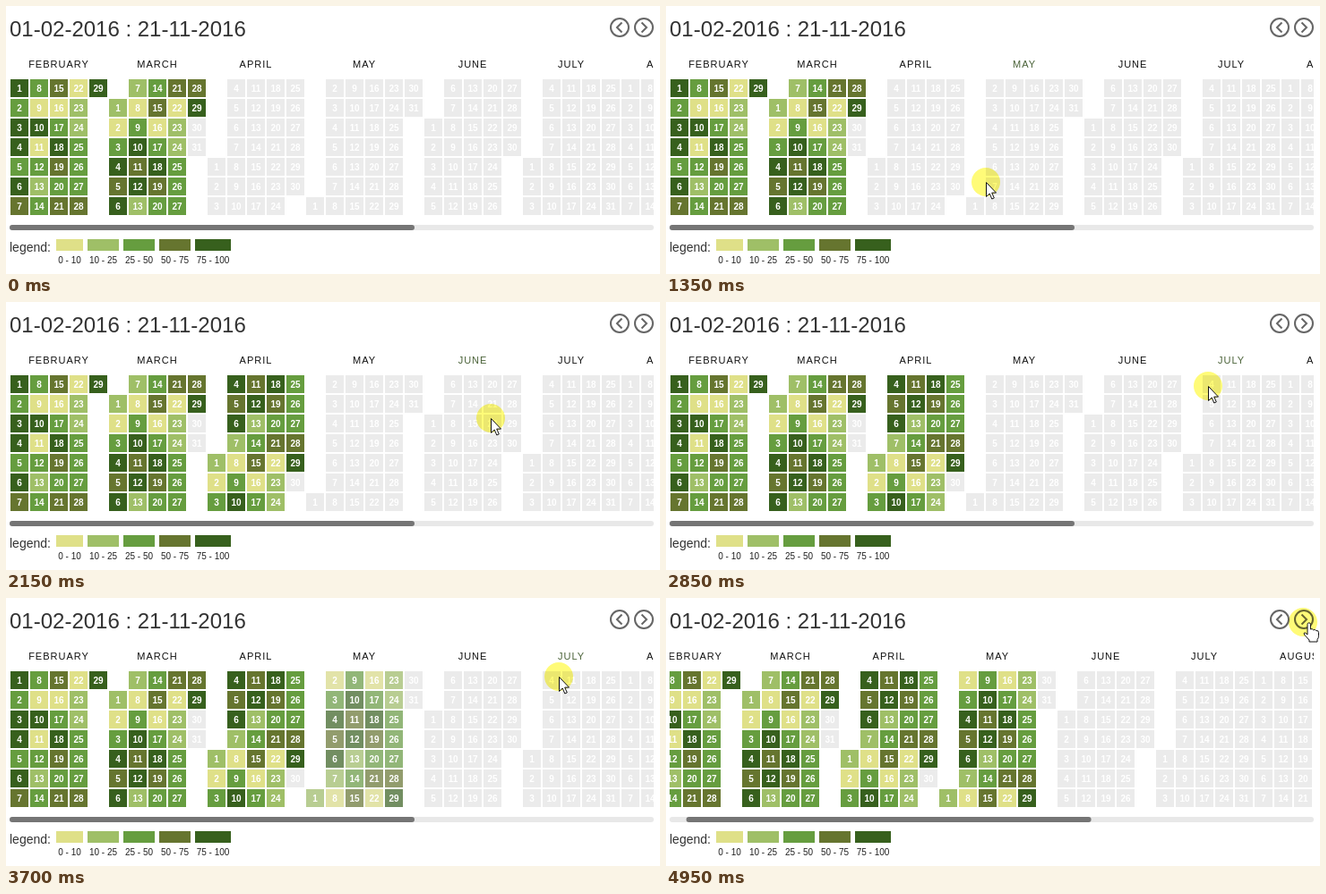
These frames come from a looping animation (730x300 px, 5 s). An HTML page:

```html
<!DOCTYPE html>
<html lang="en">
<head>
<meta charset="utf-8">
<title>Calendar heat map</title>
<style>
html, body { margin: 0; width: 100%; height: 100%; overflow: hidden; background: #fff; }
svg { display: block; font-family: "Liberation Sans", Arial, sans-serif; }
.title { font-size: 24px; fill: #333; }
.month { font-size: 11px; letter-spacing: 1px; text-anchor: middle; }
.day { font-size: 10px; font-weight: bold; fill: #fff; text-anchor: middle; }
.legend { font-size: 14px; fill: #333; }
.range { font-size: 10px; fill: #222; text-anchor: middle; }
.icon { fill: none; stroke: #666; stroke-width: 2; }
.pointer { fill: #fff; stroke: #111; stroke-linejoin: round; }
#halo { fill: #fffb78; mix-blend-mode: multiply; }
</style>
</head>
<body>
<svg id="stage" width="730" height="300">
  <text class="title" x="4" y="34">01-02-2016 : 21-11-2016</text>
  <g class="icon">
    <circle cx="685" cy="24" r="10"/><path d="M687.5 18.5L682 24l5.5 5.5"/>
    <circle cx="712" cy="24" r="10"/><path d="M709.5 18.5L715 24l-5.5 5.5"/>
  </g>
  <svg x="4" width="719" height="300"><g id="months"></g></svg>
  <rect x="4" y="245" width="719" height="6" rx="3" fill="#e8e8e8"/>
  <rect id="thumb" x="4" y="245" width="452" height="6" rx="3" fill="#757575"/>
  <text class="legend" x="4" y="275">legend:</text>
  <g id="legend"></g>
  <circle id="halo" r="16"/>
  <path id="arrow" class="pointer" d="M.5 .5V16.500l3.700-3.500 2.600 6 2.500-1.100-2.600-5.800H11.500z"/>
  <path id="hand" class="pointer" d="M5 14V2.500a1.700 1.700 0 0 1 3.400 0V8q2-1.200 3.200.8 2-1 3.100.8 2.800-.6 2.800 2v4q0 2-1.500 4v2.400H7v-2L1.500 14q-1.200-2.600 1.200-2z"/>
</svg>
<script>
const LOOP = 5000, STEP = 50, PITCH = 22, TOP = 82;
const COLORS = ['#dfe088', '#9fbf67', '#669d3f', '#66752f', '#37601d'];
const FEBRUARY = '42442432040212302432301122234';
const LATER = '10243410243412302432301122234';
const FADE = 450, fadeStart = { 3: 1400, 4: 3400 };
// time, x, y
const POINTER = [
  [350, -40, 230], [900, 10, 225], [1350, 357, 197], [2150, 541, 130],
  [2850, 605, 94], [3700, 617, 88], [4000, 627, 82], [4350, 709, 28], [4950, 711, 27]
];

const $ = id => document.getElementById(id);
const clamp = v => Math.max(0, Math.min(1, v));

function add(parent, tag, attrs, text) {
  const el = document.createElementNS('http://www.w3.org/2000/svg', tag);
  for (const key in attrs) el.setAttribute(key, attrs[key]);
  if (text !== undefined) el.textContent = text;
  return parent.appendChild(el);
}

function buildMonths() {
  const months = [];
  let column = 0;
  for (let m = 1; m <= 10; m++) {
    const first = (new Date(2016, m, 1).getDay() + 6) % 7;
    const days = new Date(2016, m + 1, 0).getDate();
    const columns = Math.ceil((first + days) / 7);
    const left = 1 + column * PITCH;
    const name = new Date(2016, m, 1).toLocaleString('en', { month: 'long' }).toUpperCase();
    const title = add($('months'), 'text', { class: 'month', x: left + columns * PITCH / 2 - 1, y: 69 }, name);
    const [base, tint, labels] = [0, 0, 0].map(() => add($('months'), 'g', {}));
    const levels = m === 1 ? FEBRUARY : m <= 4 ? LATER : '';
    for (let d = 0; d < days; d++) {
      const x = left + Math.floor((first + d) / 7) * PITCH;
      const y = TOP + (first + d) % 7 * PITCH;
      const box = { x, y, width: 20, height: 20 };
      add(base, 'rect', { ...box, fill: '#ebebeb' });
      if (levels[d]) add(tint, 'rect', { ...box, fill: COLORS[levels[d]] });
      add(labels, 'text', { class: 'day', x: x + 10, y: y + 13.5 }, d + 1);
    }
    months.push({ title, tint, left: left + 4, right: left + 4 + columns * PITCH, start: fadeStart[m] });
    column += columns;
  }
  return months;
}

function buildLegend() {
  const ranges = ['0 - 10', '10 - 25', '25 - 50', '50 - 75', '75 - 100'];
  const widths = [30, 35, 35, 35, 40];
  let x = 56;
  ranges.forEach((range, i) => {
    add($('legend'), 'rect', { x, y: 261, width: widths[i], height: 13, fill: COLORS[i] });
    add($('legend'), 'text', { class: 'range', x: x + widths[i] / 2, y: 288 }, range);
    x += widths[i] + 5;
  });
}

function pointerAt(t) {
  const i = POINTER.findIndex(p => p[0] > t);
  if (i < 1) return (i ? POINTER[POINTER.length - 1] : POINTER[0]).slice(1);
  const [a, b] = [POINTER[i - 1], POINTER[i]];
  const k = (t - a[0]) / (b[0] - a[0]);
  return [a[1] + (b[1] - a[1]) * k, a[2] + (b[2] - a[2]) * k];
}

const months = buildMonths();
buildLegend();

function draw() {
  const t = Math.floor(performance.now() / STEP) * STEP % LOOP;
  const [x, y] = pointerAt(t);
  const scroll = 30 * clamp((t - 4700) / 200);
  const overIcon = x > 700 && y < 40;

  for (const m of months) {
    const hovered = y >= TOP && y < 236 && x + scroll >= m.left && x + scroll < m.right;
    m.title.setAttribute('fill', hovered ? '#4a6238' : '#111');
    if (m.start) m.tint.setAttribute('opacity', clamp((t - m.start) / FADE));
  }
  $('months').setAttribute('transform', `translate(${-scroll})`);
  $('thumb').setAttribute('x', 4 + scroll * 0.62);
  for (const id of ['halo', 'arrow', 'hand']) $(id).setAttribute('transform', `translate(${x} ${y})`);
  $('arrow').style.display = overIcon ? 'none' : '';
  $('hand').style.display = overIcon ? '' : 'none';
  requestAnimationFrame(draw);
}
draw();
</script>
</body>
</html>
```
